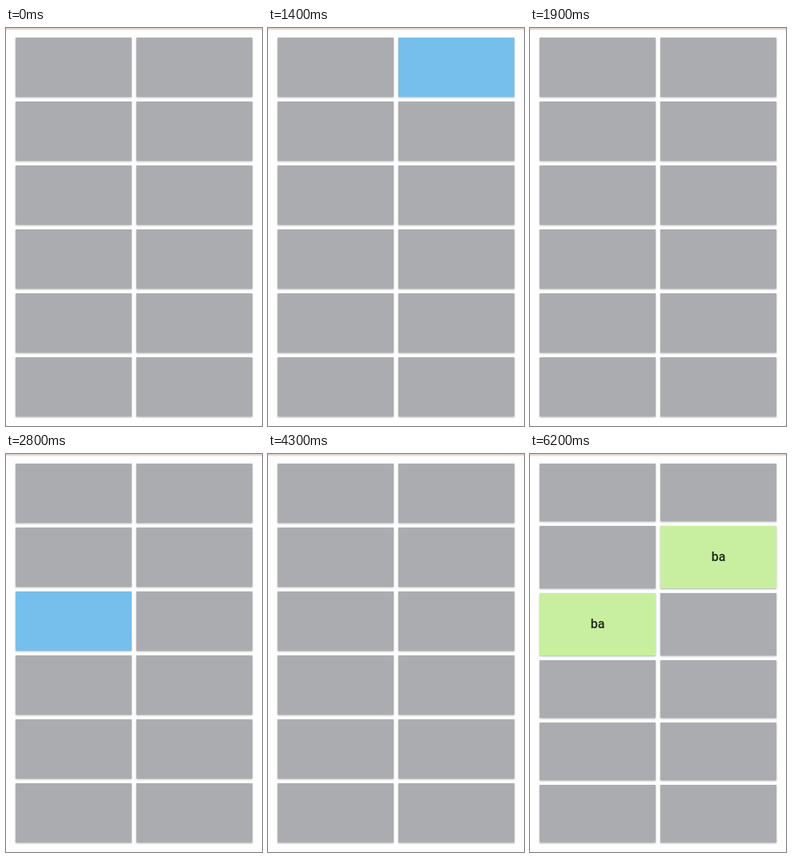
Animation, 320 px wide and 498 px high, one loop 6300 ms. Source, as an HTML page:

```html
<!DOCTYPE html>
<html lang="en">
<head>
<meta charset="utf-8">
<title>Matching tiles</title>
<style>
  :root {
    --idle: #abacb0;
    --pick: #76beeb;
    --miss: #fb6868;
    --match: #c8ef9f;
  }
  html, body {
    margin: 0;
    width: 100%;
    height: 100%;
    overflow: hidden;
    background: #fefefe;
  }
  .bar {
    position: absolute;
    inset: 0 0 auto;
    height: 3px;
    background: linear-gradient(#d8cdc5, #e6ded9 50%, #faf8f7);
  }
  .board {
    position: absolute;
    left: 12px;
    top: 12px;
    display: grid;
    grid-template-columns: 145px 145px;
    grid-template-rows: repeat(6, 74px);
    gap: 6px;
    animation: rows 6.3s step-end infinite;
  }
  .tile {
    display: flex;
    align-items: center;
    justify-content: center;
    min-height: 0;
    background: var(--idle);
    box-shadow: 0 1px 2px rgba(0, 0, 0, .32);
    font: 500 16px/20px Roboto, sans-serif;
    color: #1d281a;
    animation: 6.3s step-end infinite;
  }
  .tile span {
    visibility: hidden;
    animation: word 6.3s step-end infinite;
  }
  .a1 { animation-name: a1; }
  .b1 { animation-name: b1; }
  .a2 { animation-name: a2; }
  .b2 { animation-name: b2; }
  .a3 { animation-name: a3; }

  /* 1% = 63 ms */
  @keyframes b1 {
    0%, 30.1% { background: var(--idle); }
    6.3% { background: var(--pick); }
    23.75% { background: var(--miss); }
  }
  @keyframes a2 {
    0%, 30.1% { background: var(--idle); }
    23.75% { background: var(--miss); }
  }
  @keyframes a3 {
    0%, 66.6% { background: var(--idle); }
    39.6% { background: var(--pick); }
    61.85% { background: var(--miss); }
    85.65%, 100% { background: var(--match); }
  }
  @keyframes a1 {
    0%, 66.6% { background: var(--idle); }
    61.85% { background: var(--miss); }
  }
  @keyframes b2 {
    0% { background: var(--idle); }
    69.8% { background: var(--pick); }
    85.65%, 100% { background: var(--match); }
  }
  @keyframes word {
    0% { visibility: hidden; }
    85.65%, 100% { visibility: visible; }
  }
  @keyframes rows {
    0% { grid-template-rows: repeat(6, 74px); }
    85.65%, 100% { grid-template-rows: 72px 78px 78px 72px 72px 72px; }
  }
</style>
</head>
<body>
  <div class="bar"></div>
  <div class="board">
    <div class="tile a1"></div>
    <div class="tile b1"></div>
    <div class="tile a2"></div>
    <div class="tile b2"><span>ba</span></div>
    <div class="tile a3"><span>ba</span></div>
    <div class="tile"></div>
    <div class="tile"></div>
    <div class="tile"></div>
    <div class="tile"></div>
    <div class="tile"></div>
    <div class="tile"></div>
    <div class="tile"></div>
  </div>
</body>
</html>
```
